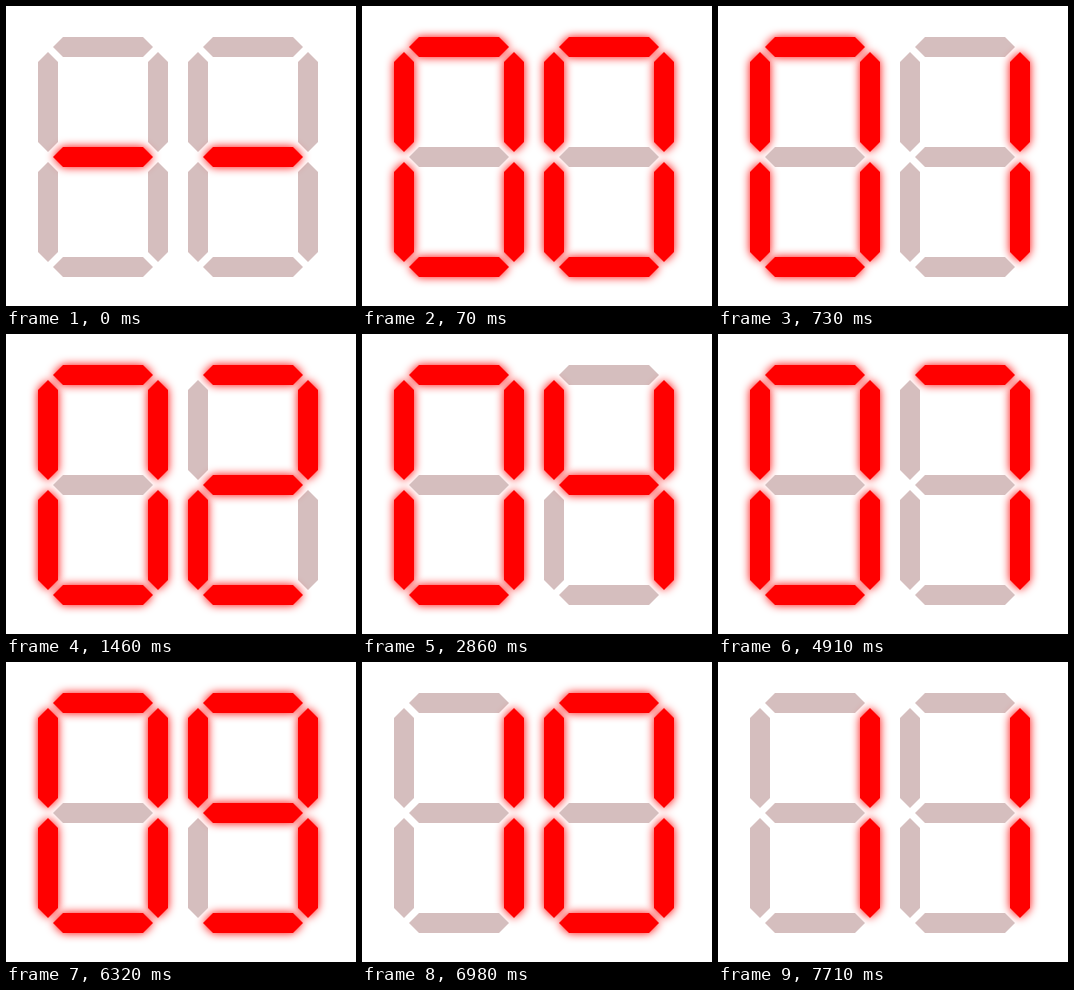
Write an HTML page without scripts that moves like this. It is 350 by 300 pixels and loops after 8000 ms.

```html
<!DOCTYPE html>
<html lang="en">
<head>
<meta charset="utf-8">
<title>Seven-segment counter</title>
<style>
  html, body { margin: 0; width: 100%; height: 100%; overflow: hidden; background: #fff; }
  svg { display: block; width: 350px; height: 300px; }

  .digit use { fill: #d5bebe; animation: 8s step-end infinite; }

  /* Tens: dash, 0, then 1 */
  .tens .a, .tens .d, .tens .e, .tens .f { animation-name: ring; }
  .tens .b, .tens .c { animation-name: side; }
  .tens .g { animation-name: dash; }

  /* Units: dash, 0 to 9, 0, 1 */
  .units .a { animation-name: ua; }
  .units .b { animation-name: ub; }
  .units .c { animation-name: uc; }
  .units .d { animation-name: ud; }
  .units .e { animation-name: ue; }
  .units .f { animation-name: uf; }
  .units .g { animation-name: ug; }

  svg { --dim: #d5bebe; --lit: #f00; --glow: drop-shadow(0 0 5px #f00); }

  @keyframes ring {
    0%, 87.25%, 100% { fill: var(--dim); filter: none; }
    .875% { fill: var(--lit); filter: var(--glow); }
  }
  @keyframes side {
    0% { fill: var(--dim); filter: none; }
    .875%, 100% { fill: var(--lit); filter: var(--glow); }
  }
  @keyframes dash {
    0% { fill: var(--lit); filter: var(--glow); }
    .875%, 100% { fill: var(--dim); filter: none; }
  }
  @keyframes ua {
    0%, 9.125%, 35.75%, 96.375%, 100% { fill: var(--dim); filter: none; }
    .875%, 18.25%, 44% { fill: var(--lit); filter: var(--glow); }
  }
  @keyframes ub {
    0%, 44% { fill: var(--dim); filter: none; }
    .875%, 61.375%, 100% { fill: var(--lit); filter: var(--glow); }
  }
  @keyframes uc {
    0%, 18.25% { fill: var(--dim); filter: none; }
    .875%, 26.625%, 100% { fill: var(--lit); filter: var(--glow); }
  }
  @keyframes ud {
    0%, 9.125%, 35.75%, 61.375%, 96.375%, 100% { fill: var(--dim); filter: none; }
    .875%, 18.25%, 44%, 70.5% { fill: var(--lit); filter: var(--glow); }
  }
  @keyframes ue {
    0%, 9.125%, 26.625%, 61.375%, 79%, 96.375%, 100% { fill: var(--dim); filter: none; }
    .875%, 18.25%, 53.125%, 70.5%, 87.25% { fill: var(--lit); filter: var(--glow); }
  }
  @keyframes uf {
    0%, 9.125%, 61.375%, 96.375%, 100% { fill: var(--dim); filter: none; }
    .875%, 35.75%, 70.5% { fill: var(--lit); filter: var(--glow); }
  }
  @keyframes ug {
    .875%, 61.375%, 87.25%, 100% { fill: var(--dim); filter: none; }
    0%, 18.25%, 70.5% { fill: var(--lit); filter: var(--glow); }
  }
</style>
</head>
<body>
<svg viewBox="0 0 350 300">
  <defs>
    <path id="h" d="M0 10 10 0H90L100 10 90 20H10Z"/>
    <path id="v" d="M10 0 20 10V90L10 100 0 90V10Z"/>
  </defs>
  <g class="digit tens" transform="translate(32 31)">
    <use class="a" href="#h" x="15" y="0"/>
    <use class="b" href="#v" x="110" y="15"/>
    <use class="c" href="#v" x="110" y="125"/>
    <use class="d" href="#h" x="15" y="220"/>
    <use class="e" href="#v" x="0" y="125"/>
    <use class="f" href="#v" x="0" y="15"/>
    <use class="g" href="#h" x="15" y="110"/>
  </g>
  <g class="digit units" transform="translate(182 31)">
    <use class="a" href="#h" x="15" y="0"/>
    <use class="b" href="#v" x="110" y="15"/>
    <use class="c" href="#v" x="110" y="125"/>
    <use class="d" href="#h" x="15" y="220"/>
    <use class="e" href="#v" x="0" y="125"/>
    <use class="f" href="#v" x="0" y="15"/>
    <use class="g" href="#h" x="15" y="110"/>
  </g>
</svg>
</body>
</html>
```
